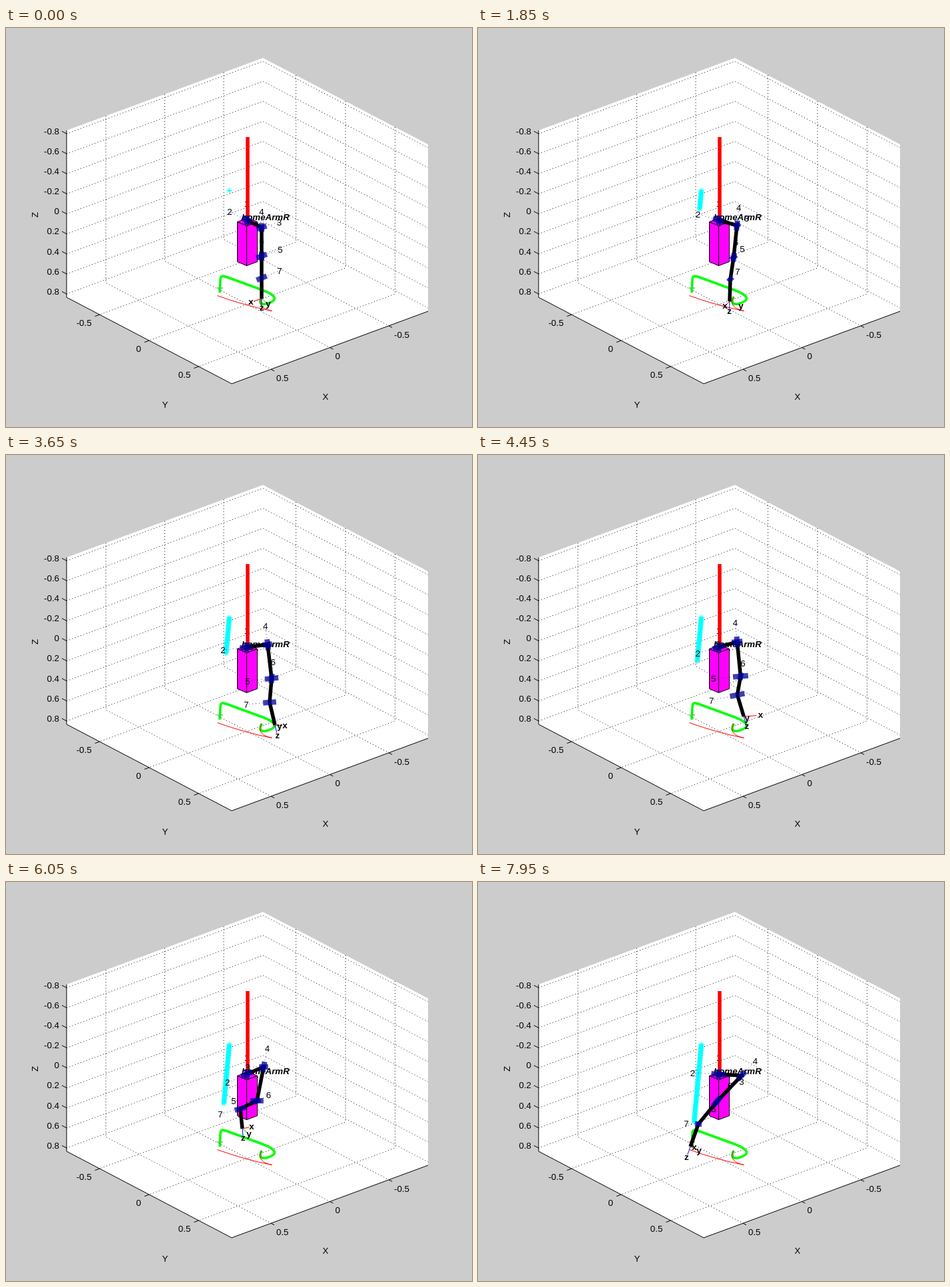
These frames come from a looping animation (700x600 px, 8000 ms). An HTML page with a canvas:

```html
<!DOCTYPE html>
<html lang="en">
<head>
<meta charset="utf-8">
<title>Arm motion</title>
<style>
html, body { margin: 0; width: 100%; height: 100%; overflow: hidden; background: #ccc; }
canvas { display: block; }
</style>
</head>
<body>
<canvas id="stage" width="700" height="600"></canvas>
<script>
const ctx = document.getElementById('stage').getContext('2d');
const LOOP = 8000, STEP = 100, LIM = 5 / 6;
const FONT = '13.33px "Liberation Sans", Arial, sans-serif';
const KEYS = [0, 19, 37, 53, 61, 71, 80];
const BASE = [361.5, 289];

// Turns x and y values at the key steps into points, with optional extra [step, x, y].
function track(xs, ys, extra) {
  const pts = KEYS.map((k, i) => [k, xs[i], ys[i]]);
  if (extra) pts.push(extra);
  return pts.sort((a, b) => a[0] - b[0]);
}

const tracks = {
  shoulder: track([384, 389, 393, 385, 387, 395, 396], [300, 297, 285, 278, 278, 283, 291]),
  elbow: track([384, 384, 399, 386, 377, 369, 359], [343, 345, 336, 330, 329, 330, 330]),
  wrist: track([384, 379, 396, 376, 352, 331, 331], [376, 378, 372, 348, 341, 348, 364]),
  hand: track([384, 378, 404, 387, 355, 315, 319], [407, 411, 406, 380, 371, 382, 398], [28, 391, 413]),
  five: track([412, 397, 363, 347, 342, 348, 354], [333, 332, 340, 331, 329, 332, 341]),
  seven: track([411, 390, 361, 340, 322, 311, 313], [365, 366, 375, 359, 349, 350, 363]),
  x: track([368, 371, 419, 403, 369, 322, 325], [412, 418, 407, 377, 368, 386, 399], [42, 429, 397]),
  y: track([394, 395, 411, 394, 365, 329, 332], [415, 418, 408, 386, 379, 390, 404], [31, 418, 416])
};

// Cubic Hermite through unevenly spaced points.
function sample(pts, n) {
  const last = pts.length - 1;
  let i = 0;
  while (i < last - 1 && n > pts[i + 1][0]) i++;
  const a = pts[i], b = pts[i + 1], h = b[0] - a[0], u = (n - a[0]) / h;
  const slope = (j, c) => {
    const p = pts[Math.max(0, j - 1)], q = pts[Math.min(last, j + 1)];
    return (q[c] - p[c]) / (q[0] - p[0]);
  };
  return [1, 2].map(c =>
    a[c] * (1 + 2 * u) * (1 - u) ** 2 + b[c] * u * u * (3 - 2 * u) +
    h * (slope(i, c) * u * (1 - u) ** 2 - slope(i + 1, c) * u * u * (1 - u)));
}

// a + (b - c) * k
const along = (a, b, c, k) => [a[0] + (b[0] - c[0]) * k, a[1] + (b[1] - c[1]) * k];
const project = (x, y, z) => [362.5 - 177 * x + 148.8 * y, 290 + 65.4 * x + 78 * y + 150.6 * z];

function trace(pts) {
  ctx.beginPath();
  pts.forEach(p => ctx.lineTo(p[0], p[1]));
}

function line(pts, color, width = 1, dash = []) {
  trace(pts);
  ctx.strokeStyle = color;
  ctx.lineWidth = width;
  ctx.setLineDash(dash);
  ctx.stroke();
  ctx.setLineDash([]);
}

function fill(pts, color) {
  trace(pts);
  ctx.fillStyle = color;
  ctx.fill();
}

function text(s, p, align = 'center', style = '') {
  ctx.font = style + ' ' + FONT;
  ctx.textAlign = align;
  ctx.fillStyle = '#000';
  ctx.fillText(s, p[0], p[1] + 4.8);
}

function drawAxes() {
  const L = LIM;
  ctx.fillStyle = '#ccc';
  ctx.fillRect(0, 0, 700, 600);
  fill([project(L, -L, -L), project(-L, -L, -L), project(-L, L, -L),
        project(-L, L, L), project(L, L, L), project(L, -L, L)], '#fff');

  const grid = (...pts) => line(pts, '#000', 1, [1, 3.5]);
  const tick = (p, dx, dy) => line([p, [p[0] + dx, p[1] + dy]], '#000');

  for (const v of [-0.5, 0, 0.5]) {
    grid(project(v, -L, -L), project(v, -L, L), project(v, L, L));
    grid(project(-L, v, -L), project(-L, v, L), project(L, v, L));
    const px = project(v, L, L), py = project(L, v, L);
    tick(px, 5, 2.6);
    tick(py, -7, 2.6);
    text(String(v), [px[0] + 8, px[1] + 13], 'left');
    text(String(v), [py[0] - 12, py[1] + 12], 'right');
  }
  for (let i = -4; i <= 4; i++) {
    const z = i / 5, p = project(L, -L, z);
    grid(p, project(-L, -L, z), project(-L, L, z));
    tick(p, -7, -3.7);
    text(String(z), [80, p[1] - 4], 'right');
  }
  line([project(L, -L, -L), project(L, -L, L), project(L, L, L), project(-L, L, L)], '#000');

  text('X', [480, 554]);
  text('Y', [239, 566]);
  ctx.save();
  ctx.translate(43, 281);
  ctx.rotate(-Math.PI / 2);
  text('Z', [0, 0]);
  ctx.restore();
}

function drawBody() {
  const left = [347.5, 291.5], front = [361.5, 297.5], right = [377.5, 291.5], back = [363.5, 285.5];
  const down = p => [p[0], p[1] + 60];
  const face = pts => {
    fill(pts, '#f0f');
    line([...pts, pts[0]], '#000');
  };
  face([left, front, right, back]);
  face([left, front, down(front), down(left)]);
  face([front, right, down(right), down(front)]);
  line([[363, 164], [363, 288]], '#f00', 5.5);
}

function drawPaths() {
  line([[317, 391], [326, 391]], '#567');
  line([[321, 387], [321, 395]], '#567');
  ctx.lineJoin = 'round';
  ctx.beginPath();
  ctx.moveTo(384, 404);
  ctx.bezierCurveTo(380, 413, 382, 416, 390, 415);
  ctx.bezierCurveTo(398, 413, 404, 410, 403.5, 406);
  ctx.bezierCurveTo(402, 401, 393, 397, 385, 394);
  ctx.lineTo(333, 375);
  ctx.bezierCurveTo(325, 372, 322, 372, 322, 379);
  ctx.lineTo(321, 398);
  ctx.strokeStyle = '#0f0';
  ctx.lineWidth = 3.6;
  ctx.stroke();
  ctx.beginPath();
  ctx.moveTo(384, 404);
  ctx.bezierCurveTo(379, 414, 381, 421, 399.5, 425.5);
  ctx.quadraticCurveTo(357, 417, 317.5, 402.5);
  ctx.strokeStyle = '#f00';
  ctx.lineWidth = 1;
  ctx.stroke();
}

function drawTrail(n) {
  for (let i = 0; i <= n; i++) {
    const x = 335.5 - 0.135 * i, y = 244.5 + 1.45 * i;
    for (const [dx, dy] of [[4, 0], [0, 4], [3, 3], [3, -3]])
      line([[x - dx, y - dy], [x + dx, y + dy]], '#0ff');
  }
}

function drawArm(n) {
  const p = {};
  for (const name in tracks) p[name] = sample(tracks[name], n);
  const { shoulder, elbow, wrist, hand, five, seven } = p;
  const three = along(shoulder, five, elbow, 0.8);
  three[0] += 4;
  const z = along(hand, hand, wrist, 0.47);

  // Each joint: centre and the labelled end of its axis.
  const joints = [
    [BASE, [361.5, 264]],
    [BASE, along(BASE, BASE, shoulder, 1.13)],
    [shoulder, three],
    [shoulder, along(shoulder, shoulder, elbow, 0.55)],
    [elbow, five],
    [elbow, along(elbow, elbow, wrist, 0.7)],
    [wrist, seven]
  ];

  joints.forEach(([c, e]) => line([c, e], '#33f', 1, [1, 4]));
  line([BASE, shoulder, elbow, wrist, hand], '#000', 5.5);
  joints.forEach(([c, e]) =>
    line([along(c, c, e, 0.28), along(c, e, c, 0.28)], 'rgba(0,0,150,.75)', 8));

  line([hand, along(hand, p.x, hand, 0.75)], '#f00');
  line([hand, along(hand, p.y, hand, 0.75)], '#0c0');
  line([hand, along(hand, z, hand, 0.75)], '#00f');

  joints.slice(1).forEach(([, e], i) => text(String(i + 2), e));
  text('x', [p.x[0], p.x[1] - 1], 'center', 'bold');
  text('y', [p.y[0], p.y[1] - 1], 'center', 'bold');
  text('z', [z[0], z[1] - 1], 'center', 'bold');
}

function frame() {
  const t = performance.now() % LOOP;
  const n = Math.floor((t + STEP / 2) / STEP);
  drawAxes();
  text('1', [361.5, 264]);
  drawBody();
  drawPaths();
  drawTrail(n);
  text('homeArmR', [354, 284], 'left', 'italic bold');
  drawArm(n);
  requestAnimationFrame(frame);
}
frame();
</script>
</body>
</html>
```
